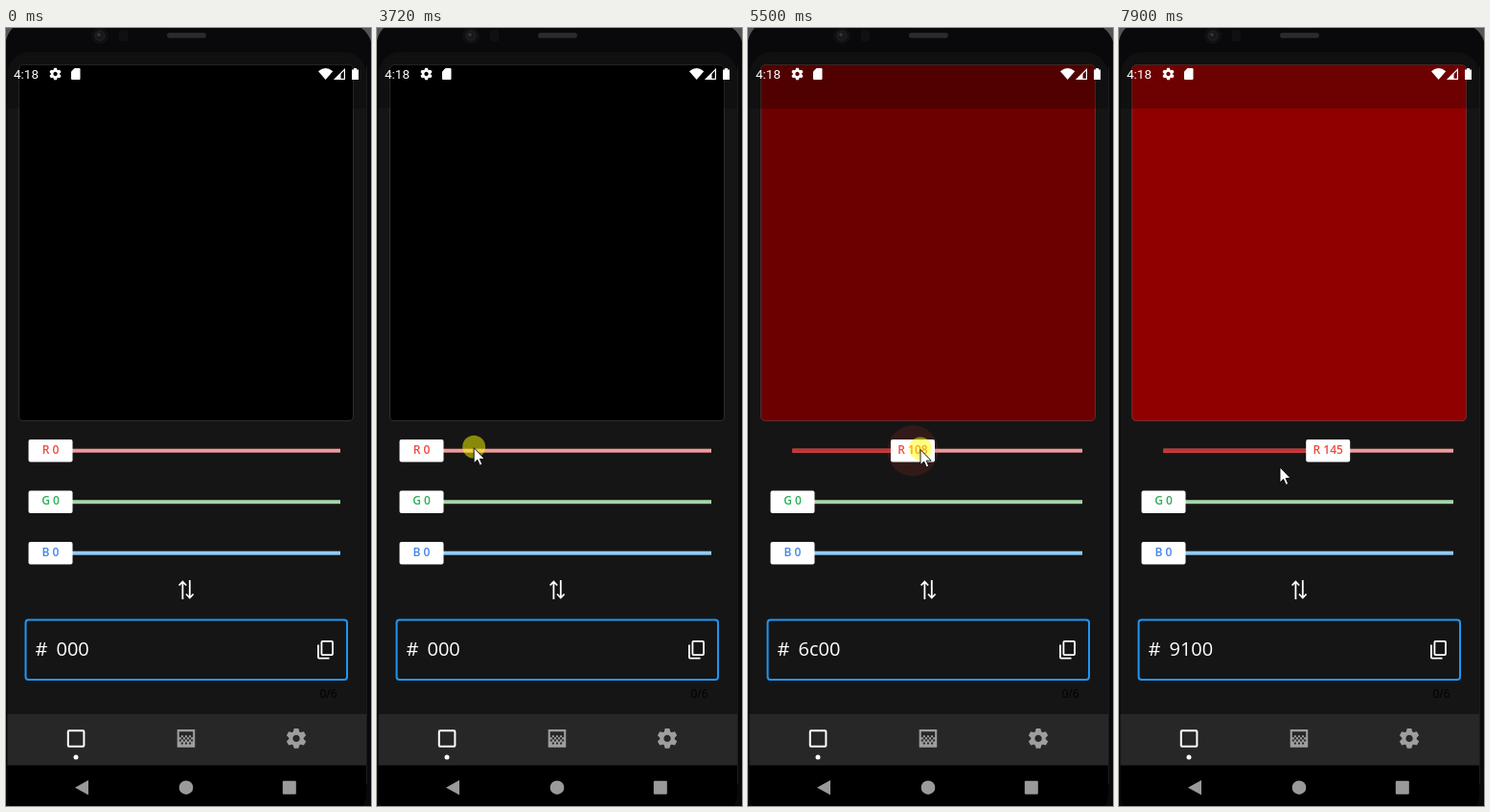
An HTML page that plays this animation: 381x813 px, repeating every 8000 ms.

```html
<!DOCTYPE html>
<html lang="en">
<head>
<meta charset="utf-8">
<title>Colour sliders</title>
<style>
html, body { margin: 0; width: 100%; height: 100%; overflow: hidden; background: #09090b; }
svg { display: block; width: 100%; height: 100%; }
.label { font: 600 12px "Open Sans", "Noto Sans", sans-serif; text-anchor: middle; }
.hex { font: 400 20px "Open Sans", "Noto Sans", sans-serif; fill: #fff; }
.count { font: 400 12px "Open Sans", "Noto Sans", sans-serif; fill: #000; }
.clock { font: 400 13.5px Roboto, sans-serif; fill: #fff; }
</style>
</head>
<body>
<svg viewBox="0 0 381 813">
  <defs>
    <clipPath id="screen"><rect x="1.5" y="25" width="374.5" height="800" rx="24"/></clipPath>
    <g id="gear"><circle r="5.4" fill="none" stroke="currentColor" stroke-width="3.8"/></g>
  </defs>

  <!-- phone body -->
  <rect width="381" height="813" fill="#09090b"/>
  <path d="M0 0H7Q2 5 0 13ZM381 0H371Q378 5 381 14Z" fill="#55565a"/>
  <path d="M376.5 40V790" stroke="#1b1b1e"/>
  <circle cx="98" cy="8" r="9" fill="#101013"/>
  <circle cx="98" cy="8" r="5" fill="#17181c" stroke="#24252a"/>
  <circle cx="97" cy="7" r="1.8" fill="#34363d"/>
  <rect x="118" y="2" width="9" height="12" rx="2" fill="#101013"/>
  <rect x="168" y="5" width="41" height="5.5" rx="2.7" fill="#2a2a2c"/>

  <g clip-path="url(#screen)">
    <rect y="25" width="381" height="788" fill="#151515"/>
    <rect id="swatch" x="13.5" y="38.5" width="349" height="372" rx="4.5" stroke="#fff" stroke-opacity=".15"/>
    <rect y="25" width="381" height="59" fill="#000" fill-opacity=".25"/>
    <rect y="717" width="381" height="54" fill="#272727"/>
    <rect y="770.5" width="381" height="43" fill="#000"/>
  </g>

  <!-- status bar -->
  <g fill="#fff" color="#fff">
    <text class="clock" x="8" y="53.4">4:18</text>
    <use href="#gear" transform="translate(51.5 48) scale(.62)"/>
    <path d="M71.5 42H76.5Q77.5 42 77.5 43V53Q77.5 54 76.5 54H69Q68 54 68 53V45.5Z"/>
    <path d="M333.6 54L326 45.2Q333.6 39 341.2 45.2Z"/>
    <path d="M353.4 43.4V53.4H343.4Z" fill="none" stroke="#fff" stroke-width="1.2"/>
    <path d="M342.5 54L349.5 47V54Z"/>
    <path d="M361 43.5H363V42H366V43.5H368V54H361Z"/>
  </g>

  <g id="sliders"></g>

  <!-- swap arrows -->
  <path d="M184.4 597V578.5M180.6 582.5L184.4 578.5L188.2 582.5M191.8 577V595.5M188 591.5L191.8 595.5L195.6 591.5" fill="none" stroke="#fff" stroke-width="1.8"/>

  <!-- hex field -->
  <rect x="20.5" y="618.5" width="335.5" height="62.5" rx="3" fill="none" stroke="#2196f3" stroke-width="2"/>
  <text class="hex" x="30.5" y="656">#</text>
  <text class="hex" id="hex" x="52.5" y="656"></text>
  <g fill="none" stroke="#fff" stroke-width="1.8">
    <rect x="329.4" y="640.9" width="11.6" height="14.2" rx="1"/>
    <path d="M325.9 644.5V657.5Q325.9 658.6 327 658.6H337.5"/>
  </g>
  <text class="count" x="327.5" y="699.5">0/6</text>

  <!-- tabs -->
  <rect x="64.8" y="734.3" width="16.6" height="16.4" rx="1" fill="none" stroke="#fff" stroke-width="2"/>
  <circle cx="73" cy="762" r="2.5" fill="#fff"/>
  <g id="grid" transform="translate(175.6 730) scale(1.03)" fill="#9e9e9e"></g>
  <use href="#gear" color="#9e9e9e" transform="translate(303 742.4) scale(1.04)"/>

  <!-- system keys -->
  <g fill="#9a9a9a">
    <path d="M72 793.7L86 786V801.4Z"/>
    <circle cx="188" cy="793.7" r="7.3"/>
    <rect x="288.8" y="786.8" width="14" height="14" rx="1"/>
  </g>

  <circle id="touch" r="12" fill="#ff0" fill-opacity=".5"/>
  <path id="cursor" d="M0 0V16L3.7 12.6L6.2 18.4L8.7 17.3L6.2 11.6H11.2Z" fill="#fff" stroke="#000" stroke-width=".9"/>
</svg>

<script>
const LOOP = 8000, X0 = 46.5, X1 = 349;
const $ = id => document.getElementById(id);

function add(parent, tag, attrs, text) {
  const el = document.createElementNS('http://www.w3.org/2000/svg', tag);
  for (const k in attrs) el.setAttribute(k, attrs[k]);
  if (text) el.textContent = text;
  return parent.appendChild(el);
}

for (let a = 0; a < 360; a += 60)
  add($('gear'), 'path', { d: 'M-3.4-6L-2.2-10H2.2L3.4-6Z', transform: `rotate(${a})`, fill: 'currentColor' });

// dithered square icon
const cell = (x, y) => `M${x} ${y}h2v2h-2z`;
let dots = 'M3 3H21V21H3ZM5 5V15H19V5ZM7 16V18H9V16ZM11 16V18H13V16ZM15 16V18H17V16Z';
for (let y = 9; y < 15; y += 2)
  for (let x = y === 11 ? 5 : 7; x < 19; x += 4) dots += cell(x, y);
add($('grid'), 'path', { d: dots, 'fill-rule': 'evenodd' });

function slider(name, y, rail, ink) {
  const g = add($('sliders'), 'g', {});
  add(g, 'rect', { x: X0, y: y - 2, width: X1 - X0, height: 4, fill: rail });
  const fill = add(g, 'rect', { x: X0 - .5, y: y - 2, width: 0, height: 4, fill: '#cf3030' });
  const halo = add(g, 'circle', { cx: X0, cy: y, r: 0, fill: '#f44336', 'fill-opacity': .13 });
  const thumb = add(g, 'g', { transform: `translate(${X0} ${y})` });
  add(thumb, 'rect', { x: -23, y: -11.6, width: 46, height: 23.4, rx: 2, fill: '#fff' });
  const label = add(thumb, 'text', { class: 'label', y: 2.9, fill: ink }, name + ' 0');
  return { y, fill, halo, thumb, label };
}
const red = slider('R', 441.7, '#ef9a9a', '#f0483e');
slider('G', 495.2, '#a5d6a7', '#2fae5a');
slider('B', 548.7, '#90caf9', '#4285e8');

// piecewise linear track: [time, value...]
function at(keys, t, i = 1) {
  if (t <= keys[0][0]) return keys[0][i];
  for (let k = 1; k < keys.length; k++) {
    const a = keys[k - 1], b = keys[k];
    if (t <= b[0]) return a[i] + (b[i] - a[i]) * (t - a[0]) / (b[0] - a[0]);
  }
  return keys[keys.length - 1][i];
}

const pointer = [
  [340, 228, 786], [560, 115, 680], [790, 8, 563],
  [1030, 0, 512], [1300, 9, 468], [1570, 19, 442.5], [1790, 26, 440.5],
  [2410, 42, 439], [2630, 42, 439], [2820, 43.5, 437.5], [2980, 43.5, 437.5],
  [3360, 70, 437.5], [3800, 108, 439], [4200, 140, 440], [4800, 160, 440],
  [5500, 180, 440.5], [6200, 199, 441], [7020, 218, 441.5],
  [7660, 221, 442], [7760, 214, 445], [7900, 168, 459]
];
const amount = [[3980, 0], [4200, 30], [4420, 68], [4800, 92], [5500, 108], [6200, 126], [7020, 142], [7400, 145]];
const place = [[4100, X0], [4200, 53.5], [4500, 122], [4900, 150], [5500, 172], [6200, 190], [7020, 207], [7660, 218.2]];
const glow = [[3960, 0], [4120, 26.5], [7660, 26.5], [7760, 25], [7880, 0]];

// moments where the picture stands still
const holds = [[800, 1030], [1790, 1890], [2410, 2630], [3360, 3460], [4220, 4320], [5090, 5190],
  [5500, 5600], [5960, 6060], [6780, 6880], [7660, 7760], [7900, 8000]];

function draw(now) {
  let t = now % LOOP;
  for (const [a, b] of holds) if (t >= a && t < b) t = a;

  const r = Math.round(at(amount, t)), x = at(place, t);
  $('swatch').setAttribute('fill', `rgb(${r},0,0)`);
  $('hex').textContent = r.toString(16) + '00';
  red.label.textContent = 'R ' + r;
  red.thumb.setAttribute('transform', `translate(${x} ${red.y})`);
  red.fill.setAttribute('width', x - X0);
  red.halo.setAttribute('cx', x);
  red.halo.setAttribute('r', at(glow, t));

  const px = at(pointer, t), py = at(pointer, t, 2);
  const seen = t >= 340 && t < 800 || t >= 1030;
  $('cursor').setAttribute('transform', `translate(${px} ${py})`);
  $('cursor').setAttribute('visibility', seen ? 'visible' : 'hidden');
  $('touch').setAttribute('transform', `translate(${px} ${py - 1})`);
  $('touch').setAttribute('visibility', t >= 2900 && t < 7640 ? 'visible' : 'hidden');
}

const start = performance.now();
function tick() {
  draw(performance.now() - start);
  requestAnimationFrame(tick);
}
tick();
</script>
</body>
</html>
```
